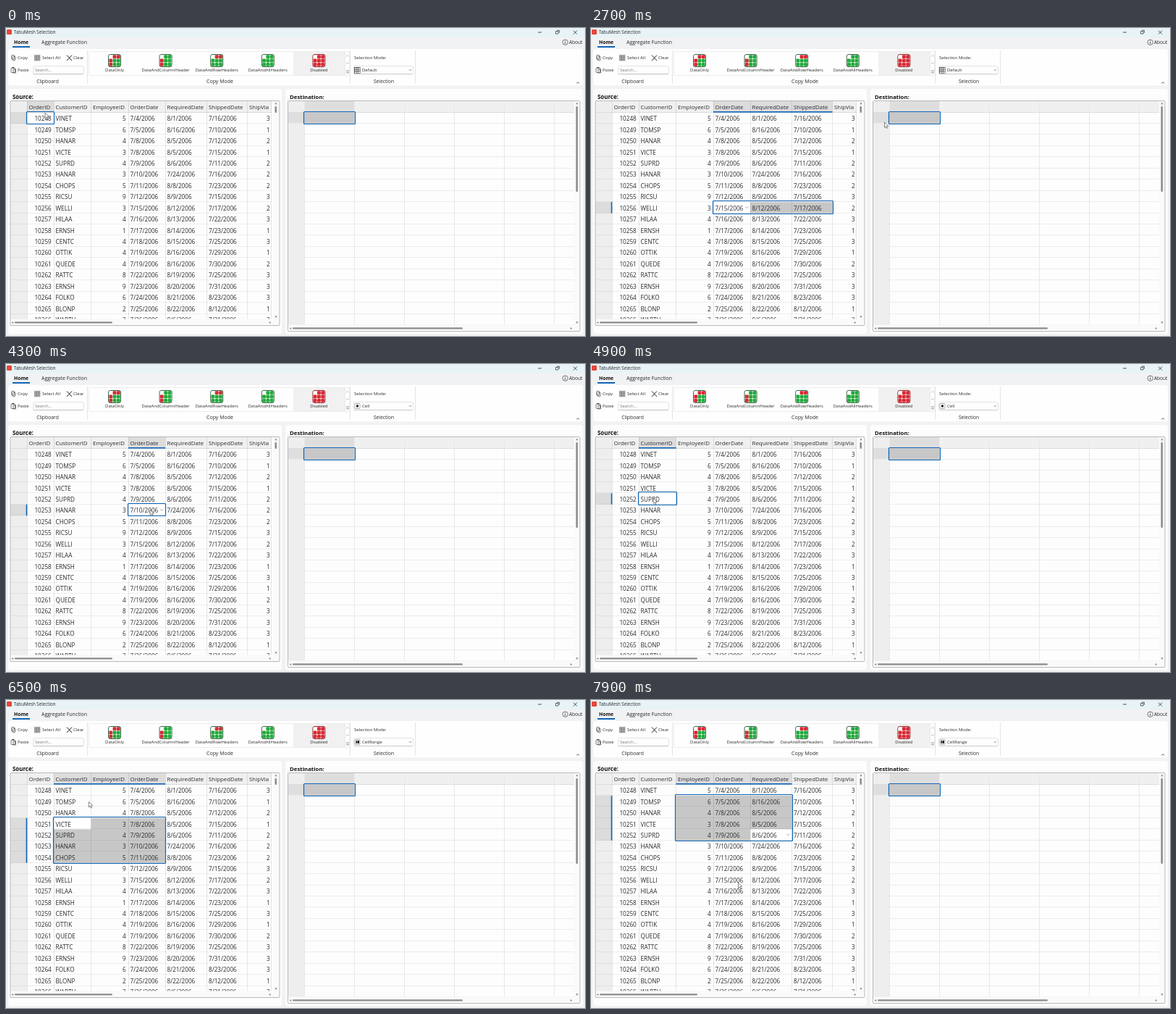
These frames come from a looping animation (800 by 425 pixels, 8000 ms). An HTML page with a canvas:

```html
<!DOCTYPE html>
<html lang="en">
<head>
<meta charset="utf-8">
<title>Grid selection</title>
<style>
html, body { margin: 0; width: 100%; height: 100%; overflow: hidden; background: #f1f2f3; }
canvas { display: block; }
</style>
</head>
<body>
<canvas id="stage" width="800" height="425"></canvas>
<script>
const stage = document.getElementById('stage');
const LOOP = 8000, ROW = 15.44, TOP = 116.6;
const BLUE = '#0f66b8', RED = '#d92a35', GREEN = '#22ab3c', INK = '#2b2b2b';
const cols = [29, 66, 117.5, 169, 220, 277.5, 333.5, 366.5];
const heads = ['OrderID', 'CustomerID', 'EmployeeID', 'OrderDate', 'RequiredDate', 'ShippedDate', 'ShipVia'];
const rows = `VINET 5 7/4 8/1 7/16 3
TOMSP 6 7/5 8/16 7/10 1
HANAR 4 7/8 8/5 7/12 2
VICTE 3 7/8 8/5 7/15 1
SUPRD 4 7/9 8/6 7/11 2
HANAR 3 7/10 7/24 7/16 2
CHOPS 5 7/11 8/8 7/23 2
RICSU 9 7/12 8/9 7/15 3
WELLI 3 7/15 8/12 7/17 2
HILAA 4 7/16 8/13 7/22 3
ERNSH 1 7/17 8/14 7/23 1
CENTC 4 7/18 8/15 7/25 3
OTTIK 4 7/19 8/16 7/29 1
QUEDE 4 7/19 8/16 7/30 2
RATTC 8 7/22 8/19 7/25 3
ERNSH 9 7/23 8/20 7/31 3
FOLKO 6 7/24 8/21 8/23 3
BLONP 2 7/25 8/22 8/12 1
WARTH 3 7/26 9/6 7/31 3`.split('\n').map((line, i) =>
  [String(10248 + i), ...line.split(' ').map(s => s.includes('/') ? s + '/2006' : s)]);

// Pointer path: time, x, y, button held until the next point
const path = [
  [0, 54, 117], [700, 60, 119], [1500, 95, 129], [2000, 190, 247, 1], [2400, 305, 249],
  [2700, 405.5, 130], [3100, 559, 59], [3350, 515, 78], [4150, 199, 201, 1], [4350, 199, 201],
  [4850, 86, 185, 1], [5000, 86, 185], [5600, 561.5, 60], [5750, 561.5, 60], [5900, 520, 88],
  [6080, 82, 171, 1], [6320, 195, 217], [6500, 114.5, 140.5], [6600, 114.5, 140.5],
  [7050, 250, 187, 1], [7450, 140, 140], [7900, 203.5, 252], [8000, 203.5, 252]
];

function pen(canvas) {
  const g = canvas.getContext('2d');
  const box = (x, y, w, h, color) => { g.fillStyle = color; g.fillRect(x, y, w, h); };
  const frame = (x, y, w, h, color, width = 1, r = 0) => {
    g.strokeStyle = color; g.lineWidth = width;
    g.beginPath(); g.roundRect(x, y, w, h, r); g.stroke();
  };
  const round = (x, y, w, h, r, color) => {
    g.fillStyle = color; g.beginPath(); g.roundRect(x, y, w, h, r); g.fill();
  };
  const line = (points, color = INK, width = .8) => {
    g.strokeStyle = color; g.lineWidth = width; g.beginPath();
    for (let i = 0; i < points.length; i += 2) g.lineTo(points[i], points[i + 1]);
    g.stroke();
  };
  const text = (s, x, y, size, align = 'left', color = INK, weight = 400) => {
    g.font = `${weight} ${size}px "Open Sans", "Noto Sans", sans-serif`;
    g.textAlign = align; g.fillStyle = color; g.fillText(s, x, y);
  };
  const chevron = (x, y, size = 1.6, color = '#555') =>
    line([x - size, y - size / 2, x, y + size / 2, x + size, y - size / 2], color, .7);
  return { g, box, frame, round, line, text, chevron };
}

function gridIcon(p, x, y, edge, colorAt) {
  p.round(x, y, 18, 18, 3.5, edge);
  p.round(x + 1, y + 1, 16, 16, 2.5, '#f4f7f4');
  for (let r = 0; r < 3; r++)
    for (let c = 0; c < 3; c++)
      p.round(x + 1.3 + c * 5.3, y + 1.3 + r * 5.3, 4.8, 4.8, 1.2, colorAt(r, c));
}

function drawRibbon(p) {
  const { g, box, frame, round, line, text, chevron } = p;
  box(0, 0, 800, 425, '#f1f2f3');
  box(0, 0, 800, 12.5, '#e7f3f6');
  round(1, 2, 7, 7, 1, '#e5473c');
  text('TabuMesh Selection', 11, 8.3, 6.2);
  line([735, 6, 740, 6]);
  frame(759.5, 4.5, 3.5, 3.5, INK, .7);
  line([761, 3.2, 764.4, 3.2, 764.4, 6.8], INK, .7);
  line([784, 3.5, 789, 8.5]); line([789, 3.5, 784, 8.5]);
  text('Home', 11, 22.3, 6.8, 'left', '#111', 700);
  box(9, 25, 24, 2, BLUE);
  text('Aggregate Function', 49, 22.3, 7);
  frame(769, 16, 7.4, 7.4, '#444', .7, 3.7);
  line([772.7, 19, 772.7, 22], INK, .8); box(772.3, 17.3, .8, .8, INK);
  text('About', 778, 22.2, 6.5);

  round(3, 29, 794, 50.5, 4, '#fefefe');
  for (const x of [112.5, 475.5, 565.5]) line([x, 31, x, 77], '#e4e4e4', 1);
  frame(7.5, 37.5, 4, 5.5, '#444', .7, 1); frame(9, 39, 4, 5.5, '#444', .7, 1);
  text('Copy', 16, 43.4, 6);
  frame(7, 55, 5.5, 6.5, '#444', .7, 1); box(8.5, 54, 2.5, 1.6, '#444');
  frame(10, 57, 3.5, 5, '#444', .7);
  text('Paste', 16, 60.2, 6);
  for (let i = 0; i < 9; i++) frame(39.5 + i % 3 * 2.7, 37.5 + (i / 3 | 0) * 2.7, 2, 2, '#444', .6);
  text('Select All', 50, 43.4, 6);
  line([84, 37.5, 91, 45], '#222', 1); line([91, 37.5, 84, 45], '#222', 1);
  text('Clear', 93, 43.4, 6);
  frame(37.5, 52.5, 70, 11, '#dcdcdc', .8, 2); line([38, 63.6, 107, 63.6], '#aaa', .6);
  text('Search...', 40, 60.2, 5.9, 'left', '#777');
  text('Clipboard', 57.5, 76.2, 6.8, 'center');
  text('Copy Mode', 295.5, 76.2, 7, 'center');
  text('Selection', 522, 76.2, 6.7, 'center');

  frame(114.5, 32.5, 360, 33, '#e8e8e8', .8, 2);
  box(397, 33, 71, 32, '#f1f1f1');
  line([468.5, 33, 468.5, 65], '#e4e4e4', .8);
  line([470, 39.5, 472, 37.5, 474, 39.5], '#999', .6);
  chevron(472, 48.5, 1.6, '#999'); chevron(472, 61.5, 1.6, '#333');
  line([470.3, 59, 473.7, 59], INK, .6);
  const modes = ['DataOnly', 'DataAndColumnHeader', 'DataAndRowHeaders', 'DataAndAllHeaders', 'Disabled'];
  modes.forEach((name, i) => {
    const x = 150 + i * 70.6;
    gridIcon(p, x - 9, 36, i === 4 ? '#a8262e' : '#3d6b45', (r, c) => {
      if (!r && !c) return '#fff';
      if (i === 4) return RED;
      const on = i === 3 || (r && c) || (i === 1 && !r) || (i === 2 && !c);
      return on ? GREEN : RED;
    });
    text(name, x, 60.2, 5.95, 'center');
  });
  text('Selection Mode:', 481, 43.3, 6);
  frame(480.5, 52.5, 82, 11, '#dcdcdc', .8, 2);
  line([481, 63.6, 562, 63.6], '#bbb', .6);
  chevron(558.5, 58);
  line([788.5, 76.5, 790.3, 74.7, 792.1, 76.5], '#333', .8);
  round(3, 84, 378, 338, 4, '#fdfdfd');
  round(386, 84, 411, 338, 4, '#fdfdfd');
  text('Source:', 9, 98.3, 7.9, 'left', '#111', 700);
  text('Destination:', 392, 98.3, 7.8, 'left', '#111', 700);
}

function drawBars(p, left, right, bottom, vThumb, hThumb) {
  const { box, round, g } = p;
  const x = right - 5, y = bottom - 4;
  box(right - 9, 101, 9, bottom - 101, '#fafafa');
  box(left, bottom - 9, right - left, 9, '#fafafa');
  round(x - 1.5, 108, 2.5, vThumb, 1.2, '#8b8b8b');
  round(left + 6, y - 1.3, hThumb, 2.4, 1.1, '#8b8b8b');
  const tip = (cx, cy, turn) => {
    g.save(); g.translate(cx, cy); g.rotate(turn); g.fillStyle = '#888';
    g.beginPath(); g.moveTo(0, -1.4); g.lineTo(1.6, 1.2); g.lineTo(-1.6, 1.2); g.fill(); g.restore();
  };
  tip(x, 104, 0); tip(x, bottom - 12, Math.PI);
  tip(left + 3, y, -Math.PI / 2); tip(right - 13, y, Math.PI / 2);
}

// Selection outline, one pixel outside the cells and snapped to whole pixels
function outline(p, left, top, right, bottom) {
  const x = Math.floor(left) - .5, y = Math.round(top) - 1.5;
  p.frame(x, y, Math.ceil(right) + .5 - x, Math.round(bottom) + .5 - y, BLUE, 1.2, 1);
}

function drawTarget(p) {
  const { box, frame, g } = p;
  const xs = [412, 481.5, 550, 619, 688, 757, 785];
  g.save();
  g.beginPath(); g.rect(390, 101, 395, 308.5); g.clip();
  box(390, 101, 395, 15.5, '#f0f0f0');
  box(390, 101, 22, 310, '#eeeeee');
  box(412, 101, 69.5, 15.5, '#dedede');
  box(390, TOP, 22, ROW, '#dedede');
  for (let r = 0; r < 20; r++) box(390, Math.round(TOP + r * ROW) - 1, 395, 1, r ? '#ececec' : '#dcdcdc');
  for (const x of xs) box(Math.floor(x), 101, 1, 310, '#e8e8e8');
  g.restore();
  box(412, 116, 69.5, 16, '#c7c7c7');
  outline(p, 412, TOP, 481.5, TOP + ROW);
  drawBars(p, 390, 794, 418.5, 118, 235);
  frame(389.5, 100.5, 403.5, 318, '#b9b9b9', 1, 1);
}

const backdrop = document.createElement('canvas');
backdrop.width = 800;
backdrop.height = 425;
const back = pen(backdrop), front = pen(stage);

function drawBackdrop() {
  drawRibbon(back);
  drawTarget(back);
}

const clamp = (v, lo, hi) => Math.min(hi, Math.max(lo, v));
const cellAt = (x, y) => [
  clamp(cols.findLastIndex(c => c <= x), 0, 6),
  clamp(Math.floor((y - TOP) / ROW), 0, 18)
];

function poseAt(t) {
  let x = 0, y = 0, from = [0, 0], to = [0, 0], used = false;
  for (let i = 0; i < path.length - 1 && path[i][0] <= t; i++) {
    const [t0, x0, y0, held] = path[i], [t1, x1, y1] = path[i + 1];
    const k = clamp((t - t0) / (t1 - t0), 0, 1), e = k * k * (3 - 2 * k);
    x = x0 + (x1 - x0) * e;
    y = y0 + (y1 - y0) * e;
    if (held) { from = cellAt(x0, y0); to = cellAt(x, y); used = true; }
  }
  return { x, y, from, to, used };
}

function drawSource({ from, to, used }) {
  const { g, box, frame, text, chevron } = front;
  const [c0, c1] = [from[0], to[0]].sort((a, b) => a - b);
  const [r0, r1] = [from[1], to[1]].sort((a, b) => a - b);
  const left = cols[c0], width = cols[c1 + 1] - left;
  const top = TOP + r0 * ROW, height = (r1 - r0 + 1) * ROW;
  g.save();
  g.beginPath(); g.rect(6, 101, 361, 301.5); g.clip();
  box(6, 101, 361, 15.5, '#f0f0f0');
  box(6, 101, 23, 302, '#eeeeee');
  box(left, 101, width, 15.5, '#dcdcdc');
  box(6, top, 23, height, '#dcdcdc');
  box(left, top, width, height, '#c7c7c7');
  box(cols[from[0]], TOP + from[1] * ROW, cols[from[0] + 1] - cols[from[0]], ROW, '#fff');
  for (let r = 0; r < 20; r++) box(6, Math.round(TOP + r * ROW) - 1, 361, 1, r ? 'rgba(0,0,0,.06)' : '#dcdcdc');
  for (const x of cols) box(Math.floor(x), 101, 1, 302, 'rgba(0,0,0,.09)');
  heads.forEach((s, c) => text(s, cols[c] + 2.5, 112.3, 7.9));
  rows.forEach((row, r) => row.forEach((s, c) => {
    const right = c === 0 || c === 2 || c === 6;
    const x = right ? cols[c + 1] - (c === 6 ? 1.8 : 3.2) : cols[c] + 2.5;
    text(s, x, TOP + r * ROW + 11.6, 8.2, right ? 'right' : 'left');
  }));
  if (used) {
    box(left, 115, width, 1.6, BLUE);
    box(27.7, top, 1.6, height, BLUE);
  }
  outline(front, left, top, left + width, top + height);
  if (from[0] > 2 && from[0] < 6) chevron(cols[from[0] + 1] - 5, TOP + from[1] * ROW + 7.5, 2, '#777');
  g.restore();
  drawBars(front, 6, 378, 410.5, 9, 135);
  frame(6, 100.5, 372, 310, '#b9b9b9', 1, 1);
}

function drawMode(t) {
  const { frame, box, text } = front;
  const mode = t < 3350 ? 'Default' : t < 5900 ? 'Cell' : 'CellRange';
  if (mode === 'Default') {
    box(481, 54, 8.5, 8.5, '#333');
    for (let i = 0; i < 9; i++) box(481.8 + i % 3 * 2.6, 54.8 + (i / 3 | 0) * 2.6, 1.9, 1.9, '#fff');
  } else {
    frame(482, 54.5, 7, 7, '#777', .6, 1);
    if (mode === 'Cell') box(484, 56.5, 3, 3, '#222');
    else { box(483.5, 56, 2, 4, '#222'); box(486, 56, 2, 4, '#222'); }
  }
  text(mode, 492, 60.2, 6);
}

function drawPointer(x, y) {
  const { g } = front;
  g.save();
  g.translate(x, y);
  g.beginPath();
  for (const [px, py] of [[0, 0], [0, 7.4], [1.7, 5.9], [2.9, 8.5], [4.1, 8], [3, 5.5], [5.2, 5.3]]) g.lineTo(px, py);
  g.closePath();
  g.fillStyle = '#fff'; g.fill();
  g.strokeStyle = '#555'; g.lineWidth = .7; g.stroke();
  g.restore();
}

function tick(now) {
  const t = now % LOOP, pose = poseAt(t);
  front.g.drawImage(backdrop, 0, 0);
  drawSource(pose);
  drawMode(t);
  drawPointer(pose.x, pose.y);
  requestAnimationFrame(tick);
}

drawBackdrop();
requestAnimationFrame(tick);
</script>
</body>
</html>
```
